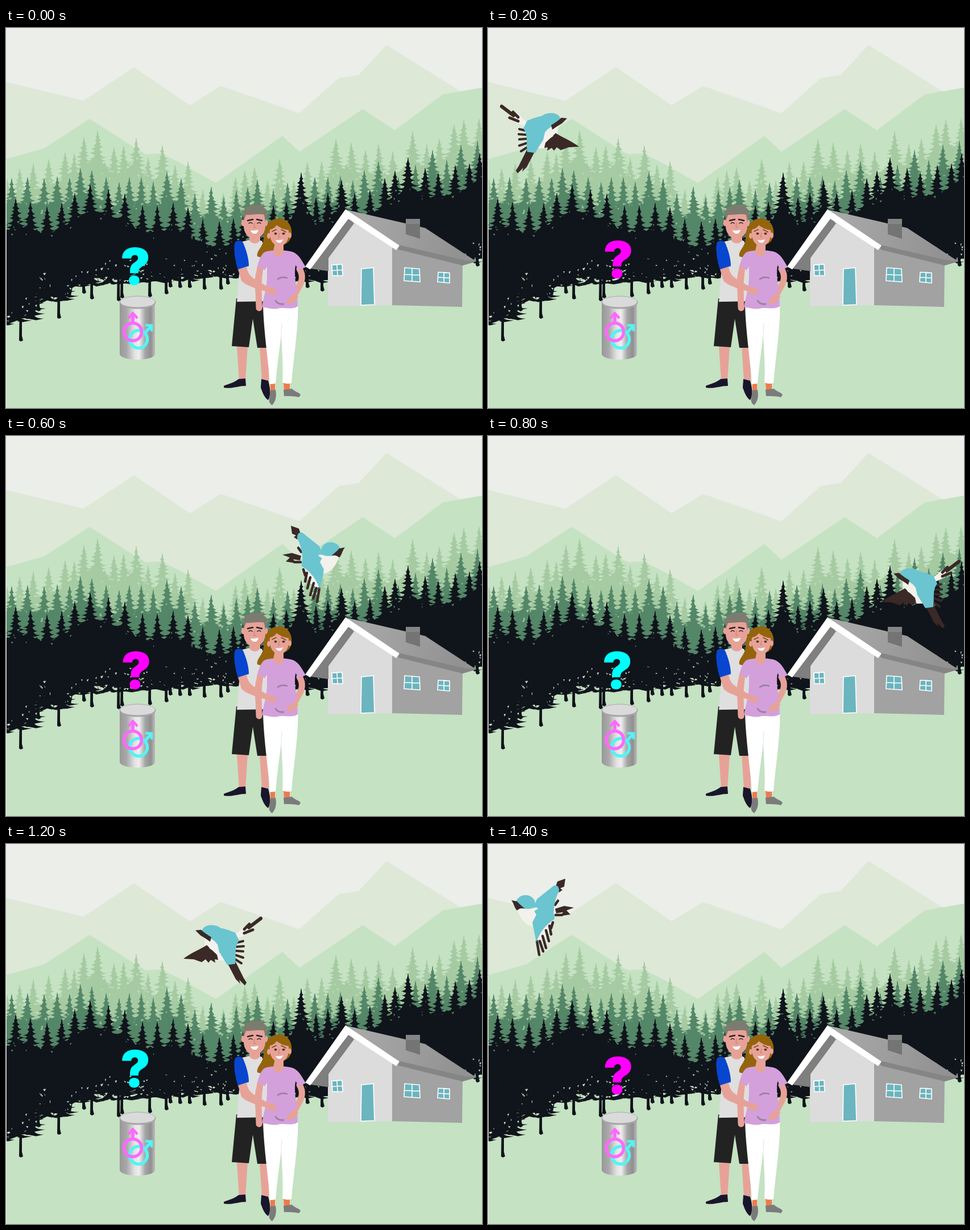
An HTML page with a canvas for the animation above (1.6 s loop, 837 by 669 pixels).

```html
<!DOCTYPE html>
<html lang="en">
<head>
<meta charset="utf-8">
<title>Couple, house and bird</title>
<style>
html, body { margin: 0; width: 100%; height: 100%; overflow: hidden; background: #eceeea; }
canvas { display: block; }
</style>
</head>
<body>
<canvas id="stage" width="837" height="669"></canvas>
<script>
const W = 837, H = 669, STEP = 200, LOOP = 1600;
const stage = document.getElementById('stage').getContext('2d');
const scene = document.createElement('canvas');
scene.width = W;
scene.height = H;
let g = scene.getContext('2d');

let seed = 11;
const rnd = () => (seed = (seed * 16807) % 2147483647) / 2147483647;

function shape(color, d) {
  g.fillStyle = color;
  g.fill(new Path2D(d));
}
function line(color, width, d, cap = 'round') {
  g.strokeStyle = color;
  g.lineWidth = width;
  g.lineCap = cap;
  g.lineJoin = 'round';
  g.stroke(new Path2D(d));
}
function oval(color, x, y, rx, ry, turn = 0) {
  g.fillStyle = color;
  g.beginPath();
  g.ellipse(x, y, rx, ry, turn, 0, Math.PI * 2);
  g.fill();
}

// Height at x on a line through flat x,y pairs
function at(pts, x) {
  if (x <= pts[0]) return pts[1];
  for (let i = 2; i < pts.length; i += 2) {
    if (x <= pts[i]) {
      const k = (x - pts[i - 2]) / (pts[i] - pts[i - 2]);
      return pts[i - 1] + (pts[i + 1] - pts[i - 1]) * k;
    }
  }
  return pts[pts.length - 1];
}

function tree(x, top, base, max) {
  for (const side of [-1, 1]) {
    g.beginPath();
    g.moveTo(x - side, top + 8);
    g.lineTo(x, top);
    for (let y = top + 8; y < base; y += 5 + rnd() * 5) {
      const w = side * Math.min(max, 1 + (y - top) * 0.36) * (0.75 + 0.4 * rnd());
      g.lineTo(x + w * 0.3, y - 2);
      g.quadraticCurveTo(x + w * 0.45, y + 3, x + w, y + 3);
      g.lineTo(x + w * 0.42, y + 6);
    }
    g.lineTo(x - side, base);
    g.fill();
  }
}

function forest(color, tips, floor, depth, max) {
  g.fillStyle = color;
  g.beginPath();
  g.moveTo(0, at(floor, 0) - 10);
  for (let x = 0; x <= W; x += 3) g.lineTo(x, at(tips, x) + depth + rnd() * 6);
  for (let x = W; x >= 0; x -= 3) g.lineTo(x, at(floor, x) - 4 - rnd() * 14);
  g.fill();
  for (let i = 0; i < tips.length; i += 2) {
    tree(tips[i], tips[i + 1], at(floor, tips[i]), max);
  }
}

function specks(color, count, from, to, line) {
  g.fillStyle = color;
  for (let i = 0; i < count; i++) {
    const x = rnd() * W, y = at(line, x) + from + rnd() * (to - from);
    const a = 1.5 + rnd() * 4, b = rnd() * 4 - 2;
    g.beginPath();
    g.moveTo(x, y);
    g.lineTo(x + a, y + b);
    g.lineTo(x + a * 0.5, y + 2 + rnd() * 2);
    g.fill();
  }
}

function land() {
  g.fillStyle = '#eceeea';
  g.fillRect(0, 0, W, H);
  shape('#dde8d7', 'M0 95L136 128L225 69L323 136L378 102L516 150L585 88L620 83L669 30L797 110L837 120V400H0Z');
  shape('#c5e2c3', 'M0 231L67 212L147 160L222 208L245 222L272 221L300 234L369 273L486 190L516 218L627 143L684 180L768 117L837 105V669H0Z');

  const far = [0, 258, 24, 247, 48, 238, 75, 230, 104, 218, 120, 220, 137, 191, 161, 180, 190, 209,
    207, 207, 229, 193, 250, 227, 275, 206, 297, 240, 320, 234, 346, 284, 382, 290, 404, 262, 420, 250,
    437, 244, 460, 268, 481, 230, 506, 268, 530, 236, 555, 234, 580, 195, 607, 201, 632, 215, 655, 204,
    680, 216, 715, 181, 740, 203, 762, 194, 788, 169, 805, 161, 832, 159];
  const mid = [10, 264, 38, 262, 67, 264, 90, 261, 112, 263, 131, 246, 151, 250, 176, 262, 199, 271,
    217, 262, 238, 262, 259, 270, 283, 252, 308, 264, 332, 290, 361, 279, 383, 297, 405, 285, 425, 280,
    442, 267, 470, 284, 495, 272, 520, 278, 543, 262, 566, 262, 588, 260, 610, 268, 630, 250, 655, 234,
    690, 262, 720, 240, 750, 214, 775, 232, 800, 205, 829, 198];
  const near = [-6, 318, 17, 299, 43, 306, 72, 314, 98, 307, 121, 290, 148, 275, 180, 283, 209, 291,
    240, 312, 266, 312, 294, 307, 320, 315, 346, 335, 375, 340, 400, 335, 417, 330, 445, 335, 470, 311,
    493, 305, 519, 254, 545, 298, 566, 289, 590, 267, 613, 290, 640, 285, 666, 264, 684, 251, 707, 228,
    737, 246, 760, 254, 790, 241, 815, 238, 833, 220];
  const floor = [0, 518, 44, 512, 49, 474, 68, 470, 74, 484, 116, 478, 122, 450, 200, 450, 300, 444,
    400, 437, 560, 446, 600, 430, 800, 412, 837, 405];

  forest('#a6cba2', far, [0, 330, W, 330], 44, 25);
  specks('#c5e2c3', 170, 34, 80, far);
  forest('#548668', mid, [0, 400, W, 400], 42, 25);
  specks('#a6cba2', 110, 28, 62, mid);
  forest('#10141b', near, floor, 44, 27);
  specks('#548668', 90, 28, 60, near);
  specks('#c5e2c3', 140, -42, 2, floor);

  const trunks = [26, 550, 57, 497, 93, 510, 137, 466, 151, 476, 198, 479, 204, 474, 253, 472, 282, 467,
    289, 455, 306, 456, 323, 456, 349, 459, 378, 459, 390, 450, 530, 456, 556, 462, 829, 418];
  for (let i = 0; i < trunks.length; i += 2) {
    const x = trunks[i], y = trunks[i + 1];
    shape('#10141b', `M${x - 2} ${y - 60}H${x + 2}L${x + 2} ${y - 8}L${x + 4} ${y}L${x} ${y + 2}L${x - 3} ${y}Z`);
  }
  g.fillStyle = '#eef1ed';
  g.fillRect(0, 232, 1, H - 232);
}

function house() {
  shape('#dcdcdc', 'M566 490V405L602 336L680 385V488Z');
  shape('#a2a2a2', 'M679 386L692 384L803 412L802 491L679 488Z');
  shape('#7f7f7f', 'M528 421L600 332L612 344L567 405V428L538 424Z');
  const roof = g.createLinearGradient(620, 330, 790, 410);
  roof.addColorStop(0, '#a8a8a8');
  roof.addColorStop(1, '#929292');
  g.fillStyle = roof;
  g.fill(new Path2D('M599 320L737 352L827 411L803 418L690 389Z'));
  shape('#858585', 'M691 382L803 408L827 411L803 418L690 390Z');
  shape('#858585', 'M703 336L728 336V371L703 363Z');
  shape('#747474', 'M703 345L728 345V371L703 363Z');
  shape('#ffffff', 'M526 420L597 319L692 383L686 391L602 336L535 425Z');

  const glass = '#6bb5bf', frame = '#ffffff';
  const pane = (d, bars) => {
    shape(glass, d);
    line(frame, 1.6, d + bars);
  };
  pane('M625 424L646 422L648 487L624 488Z', '');
  pane('M573 417L591 416L592 436L574 436Z', 'M582 416L583 436M573 427L592 426');
  pane('M701 422L727 424L728 447L700 445Z', 'M714 423L714 446M700 434L728 435');
  pane('M760 430L780 431L780 449L759 447Z', 'M770 430L770 448M760 439L780 440');
}

function can() {
  const metal = g.createLinearGradient(200, 0, 262, 0);
  [[0, '#989898'], [0.2, '#a9a9a9'], [0.42, '#e2e2e2'], [0.55, '#eeeeee'], [0.72, '#a6a6a6'], [0.88, '#8f8f8f'], [1, '#bdbdbd']]
    .forEach(([k, c]) => metal.addColorStop(k, c));
  g.fillStyle = metal;
  g.fill(new Path2D('M200 483V574C202 587 260 587 262 574V483Z'));
  oval('#a5a5a5', 231.5, 483, 32, 11.5);
  oval('#dadada', 231.5, 482, 30.5, 9.5);
  const cyan = '#55f3f5', pink = '#fb6afb';
  line(cyan, 5.5, 'M217.5 548a15.5 15.5 0 1 0 31 0a15.5 15.5 0 1 0 -31 0M244 537L255 525', 'butt');
  line(cyan, 4.5, 'M245 523.5H256V534', 'butt');
  line(pink, 5.5, 'M207.5 535a15.5 15.5 0 1 0 31 0a15.5 15.5 0 1 0 -31 0M223 520V504', 'butt');
  line(pink, 4.5, 'M215 511L223 502L231 511', 'butt');
}

function man() {
  const skin = '#e7a298';
  shape(skin, 'M406 560H425L421 621H410Z');
  shape(skin, 'M446 560H463L462 622H450Z');
  shape('#19152a', 'M383 630C390 627 402 624 409 618L421 617L422 630C408 630 396 636 383 633Z');
  shape('#19152a', 'M449 618L461 621C466 638 465 648 461 655C455 652 451 642 448 633Z');
  shape('#222222', 'M405 476L454 478L464 560L462 563H442L434 512L427 562L397 560Z');
  shape('#dfdfdf', 'M414 377C423 373 442 371 450 375L464 400V481L406 482L411 420Z');
  shape(skin, 'M428 360H447V373C444 381 432 381 428 374Z');
  shape('#0846d0', 'M403 377C408 373 414 374 417 378C422 390 427 405 427 419L408 426C403 410 399 388 403 377Z');
  oval(skin, 417, 343, 3.5, 6);
  oval(skin, 457, 343, 3.5, 6);
  shape(skin, 'M418 327H456V348C456 363 446 371 437 371C428 371 418 363 418 348Z');
  shape('#7d7b70', 'M418 340C415 324 418 317 426 314C435 310 447 313 454 310L452 315L459 321C460 328 458 335 456 341L454 329C445 326 430 330 422 329Z');
  line('#25202a', 2.6, 'M425 339L434 337M441 337L450 339');
  line('#25202a', 1.4, 'M427 344Q430 341 433 344M442 344Q445 341 448 344');
  line('#c9837b', 1.4, 'M437 343L436 351H439');
  shape('#ffffff', 'M430 356Q437 358 444 355Q442 363 437 362Q432 362 430 356Z');
}

function woman() {
  const skin = '#e7a298', top = '#d3a0dc';
  shape('#94640c', 'M480 335C497 335 506 353 501 369C498 378 492 380 488 381L477 388C472 402 453 407 442 402C440 392 451 387 453 372C453 352 462 335 480 335Z');
  shape('#ee7a4d', 'M465 624H473V639H465ZM488 624H499V637H489Z');
  shape('#7b7b7b', 'M488 637L503 635C508 641 516 641 518 646L515 650C506 648 497 648 489 648Z');
  shape('#7b7b7b', 'M465 638L474 637C476 648 475 656 468 664C463 661 462 656 463 651Z');
  shape('#ffffff', 'M452 487H513C515 520 507 570 502 625Q495 628 486 624C488 600 485 565 484 540C481 565 476 600 474 626L464 627C462 590 453 535 452 487Z');
  line('#d9e2d6', 0.9, 'M484 540L485 520');
  // Arms
  line(skin, 11, 'M447 421C445 436 443 452 444 463L445 493');
  line(skin, 11, 'M516 424C524 437 520 448 513 459L503 477');
  shape(top, 'M454 395C464 390 494 390 506 395C516 400 521 411 527 421L515 427L509 417C506 438 511 455 512 469L513 490C503 497 487 491 478 494C468 496 458 492 450 491C453 475 459 456 459 437V420L455 426L442 420C445 409 447 401 454 395Z');
  shape(skin, 'M473 378H488V393C488 405 470 405 470 393Z');
  oval(skin, 462, 366, 3, 5);
  oval(skin, 499, 365, 3, 5);
  shape(skin, 'M464 355C468 354 473 352 476 347C483 353 491 355 497 356C499 371 492 384 481 384C469 384 462 370 464 355Z');
  line('#74500f', 1.7, 'M468 358L475 355M484 355L492 359');
  oval('#52372c', 474, 362, 2.5, 2);
  oval('#52372c', 488, 362, 2.5, 2);
  line('#c9837b', 1.2, 'M481 361L479 368H482');
  shape('#ffffff', 'M474 373Q480 375 487 372Q485 379 480 378Q476 378 474 373Z');
  // Hands on the belly
  shape(skin, 'M408 425L423 420C424 429 429 437 436 441L461 456C468 456 475 460 476 465L473 469C465 470 459 467 455 463C440 459 421 453 414 445Z');
  shape(skin, 'M510 464L500 474C495 475 493 480 494 485C500 487 508 484 514 473Z');
  line(skin, 9, 'M446 425C441 439 441 455 444 468L446 493');
  line('#9c829f', 2.5, 'M478 442Q485 437 494 440');
  line('#9c829f', 3, 'M474 480Q478 487 488 486');
}

const BLUE = '#6ac5d0', DARK = '#3a2926', PALE = '#f2f1ec';
const poses = {
  up() {
    line(PALE, 8, 'M299 116L311 148');
    shape(PALE, 'M298 148L320 144L300 178L284 180Z');
    line(DARK, 5.5, 'M279 112L296 138M286 121L298 140');
    line(DARK, 5, 'M307 88L316 106M315 94L321 108M306 102L313 114');
    line(DARK, 4, 'M305 120L308 129M292 153L302 149M288 161L300 157M280 169L296 165M270 179L294 173M264 186L286 181');
    line(DARK, 5, 'M256 194L282 188');
    shape(BLUE, 'M309 112Q315 105 322 109L334 153L317 160Z');
    shape(BLUE, 'M335 151C323 143 309 145 302 149L303 160C295 174 286 185 277 193C296 193 325 190 334 183L340 166Z');
    shape(PALE, 'M332 156C340 156 341 164 358 168L361 174C354 181 343 184 330 182Z');
    oval(BLUE, 355, 159, 19, 14);
    shape(PALE, 'M337 165L357 168L362 176L347 183L333 179Z');
    shape(DARK, 'M353 166Q363 163 371 167L378 174L367 173L362 178Q359 171 353 166Z');
  },
  back() {
    shape(PALE, 'M553 207L586 207C584 224 574 238 560 242L548 232Z');
    shape(PALE, 'M521 226L535 232L552 270L532 258Z');
    shape(DARK, 'M501 158L515 163L520 178L512 182L506 178L510 175L503 172Z');
    shape(DARK, 'M486 209L503 206L519 211L517 219L505 217L510 224L492 221L499 214Z');
    line(DARK, 4.5, 'M514 197L519 204M507 222L518 222M523 235L526 245M529 241L526 256M535 249L530 268M541 259L535 280M546 268L540 286M551 268L547 292');
    shape(BLUE, 'M512 180Q512 168 521 170L551 194L558 211L548 229L520 229C524 216 519 192 512 180Z');
    shape(BLUE, 'M520 222L549 216L559 235L552 270C547 254 536 239 520 229Z');
    oval(BLUE, 571, 202, 17, 15);
    shape(PALE, 'M549 211C553 205 559 213 571 211L586 210C582 225 573 238 563 241L557 216Z');
    shape(DARK, 'M572 211C576 207 581 204 586 198L596 196C591 202 591 209 586 214Q579 208 572 211Z');
  },
  spread() {
    shape(PALE, 'M349 164L363 165L386 205L374 205L350 191Z');
    shape(DARK, 'M312 202C326 191 339 187 353 178L371 195L373 204L367 203L368 209L360 204L356 209L351 203L344 208L330 203Z');
    line(PALE, 8, 'M404 164L422 148');
    line(PALE, 5, 'M404 165L422 157');
    line(DARK, 6, 'M427 147L448 131');
    line(DARK, 5, 'M419 150L428 141M419 157L434 151');
    line(DARK, 4, 'M404 174L417 171M404 181L418 180M403 188L417 189M402 195L417 200M400 201L414 210');
    shape(DARK, 'M390 211L403 206L418 236L423 244L420 249L410 239L412 246L404 238Z');
    shape(BLUE, 'M360 150C379 143 397 155 403 156L410 170C401 181 405 196 403 211L389 213C382 201 374 187 364 176Z');
    oval(BLUE, 364, 157, 20, 14, 0.2);
    shape(PALE, 'M350 165Q363 164 372 177L376 195L358 184Z');
    shape(DARK, 'M333 152L343 151C349 157 355 160 361 164L359 172Q351 166 342 161Z');
  }
};

// Per step: pose, mirror axis sum (0 = as drawn), x shift, y shift
const flight = [
  null,
  ['spread', 472, 0, 7],
  ['up', 0, 0, 0],
  ['back', 0, 0, 0],
  ['spread', 0, 380, 90],
  ['up', 898, 0, 100.5],
  ['spread', 0, 0, 0],
  ['back', 637, 0, -97]
];
const bob = [386, 374, 368, 379, 379, 367, 362, 374];

function bird([pose, mirror, dx, dy]) {
  g.save();
  g.translate(mirror || dx, dy);
  if (mirror) g.scale(-1, 1);
  poses[pose]();
  g.restore();
}

function draw(now) {
  const i = Math.floor((now % LOOP) / STEP), odd = i % 2;
  g.drawImage(scene, 0, 0);
  g.font = '900 89px Inter, "Open Sans", sans-serif';
  g.textAlign = 'center';
  g.fillStyle = odd ? '#ff00ff' : '#00ffff';
  g.fillText('?', odd ? 229 : 227.5, bob[i] + 66);
  if (flight[i]) bird(flight[i]);
  requestAnimationFrame(tick);
}

land();
house();
can();
man();
woman();
g = stage;
let start = null;
function tick(now) {
  if (start === null) start = now;
  draw(now - start);
}
requestAnimationFrame(tick);
</script>
</body>
</html>
```
